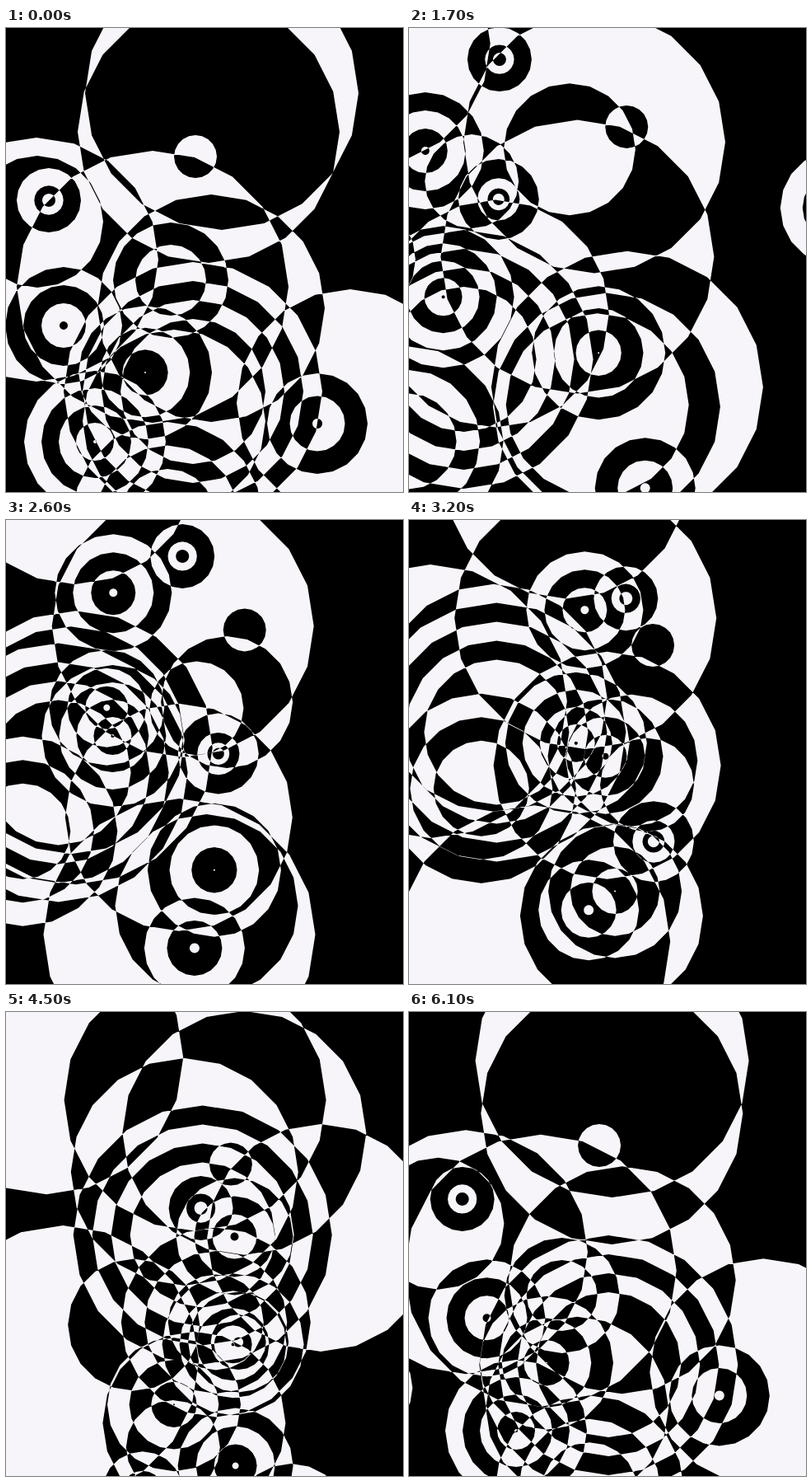
An HTML page that plays this animation: 482 by 563 pixels, repeating every 6.2 s.

```html
<!DOCTYPE html>
<html>
<head>
<meta charset="utf-8">
<title>Orbiting rings</title>
<style>
html, body { margin: 0; width: 100%; height: 100%; overflow: hidden; background: #000; }
svg { display: block; width: 482px; height: 563px; }
</style>
</head>
<body>
<svg viewBox="0 0 482 563"><path id="rings" fill="#f7f5f9" fill-rule="evenodd"/></svg>
<script>
const FRAMES = 62, STEP_MS = 100, TURN = 0.1, SIDES = 20;
const path = document.getElementById("rings");
const point = (x, y) => ({ x, y });

// turns a starting point clockwise about a pivot
function rotate(pivot, start, angle) {
  const c = Math.cos(angle), s = Math.sin(angle);
  const dx = start.x - pivot.x, dy = start.y - pivot.y;
  return point(pivot.x + dx * c - dy * s, pivot.y + dx * s + dy * c);
}

function polygon(mid, r) {
  const corner = i => {
    const p = rotate(mid, point(mid.x + r, mid.y), i * 2 * Math.PI / SIDES);
    return p.x.toFixed(1) + " " + p.y.toFixed(1);
  };
  return "M" + Array.from({ length: SIDES }, (_, i) => corner(i)).join("L") + "Z";
}

// ring spacing from the outer to the inner radius
const even = (outer, inner, n) =>
  Array.from({ length: n }, (_, i) => outer + (inner - outer) * i / (n - 1));
const shrinking = (outer, inner, n) =>
  Array.from({ length: n }, (_, i) => outer * (inner / outer) ** (i / (n - 1)));

const groups = [];
const orbit = (pivot, start, ...radii) => groups.push({ pivot, start, radii });

// plain discs
orbit(point(146, 153), point(262, 79), 166);
orbit(point(168, 413), point(178, 314), 165);
orbit(point(230, 123), point(246, 126), 159);
orbit(point(109, 112), point(37, 281), 148);
orbit(point(327, 379), point(418, 455), 138);
orbit(point(174, 280), point(249, 340), 138);
orbit(point(225, 478), point(204, 477), 111);
orbit(point(155, 260), point(38, 235), 80);
orbit(point(110, 368), point(-66, 425), 57);
orbit(point(263, 153), point(230, 156), 26);

// ringed discs
orbit(point(164, 351), point(227, 441), ...even(157, 88, 4));
orbit(point(138, 461), point(196, 593), ...even(115, 58, 3));
orbit(point(152, 385), point(108, 502), ...even(86, 2, 5));
orbit(point(210, 433), point(169, 418), ...even(81, 1, 4));
orbit(point(138, 233), point(70, 361), ...even(71, 5, 4));
orbit(point(85, 445), point(-59, 612), ...even(70, 4, 4));
orbit(point(399, 403), point(200, 306), ...even(70, 43, 2));
orbit(point(298, 479), point(378, 480), ...even(61, 6, 3));
orbit(point(105, 400), point(-86, 421), ...shrinking(49, 7, 4));
orbit(point(156, 149), point(52, 209), ...shrinking(39, 8, 3));

function draw(step) {
  const shapes = groups.map(({ pivot, start, radii }) => {
    const mid = rotate(pivot, start, step * TURN);
    return radii.map(r => polygon(mid, r)).join("");
  });
  path.setAttribute("d", shapes.join(""));
}

function tick() {
  draw(Math.floor(performance.now() / STEP_MS) % FRAMES);
  requestAnimationFrame(tick);
}
tick();
</script>
</body>
</html>
```
